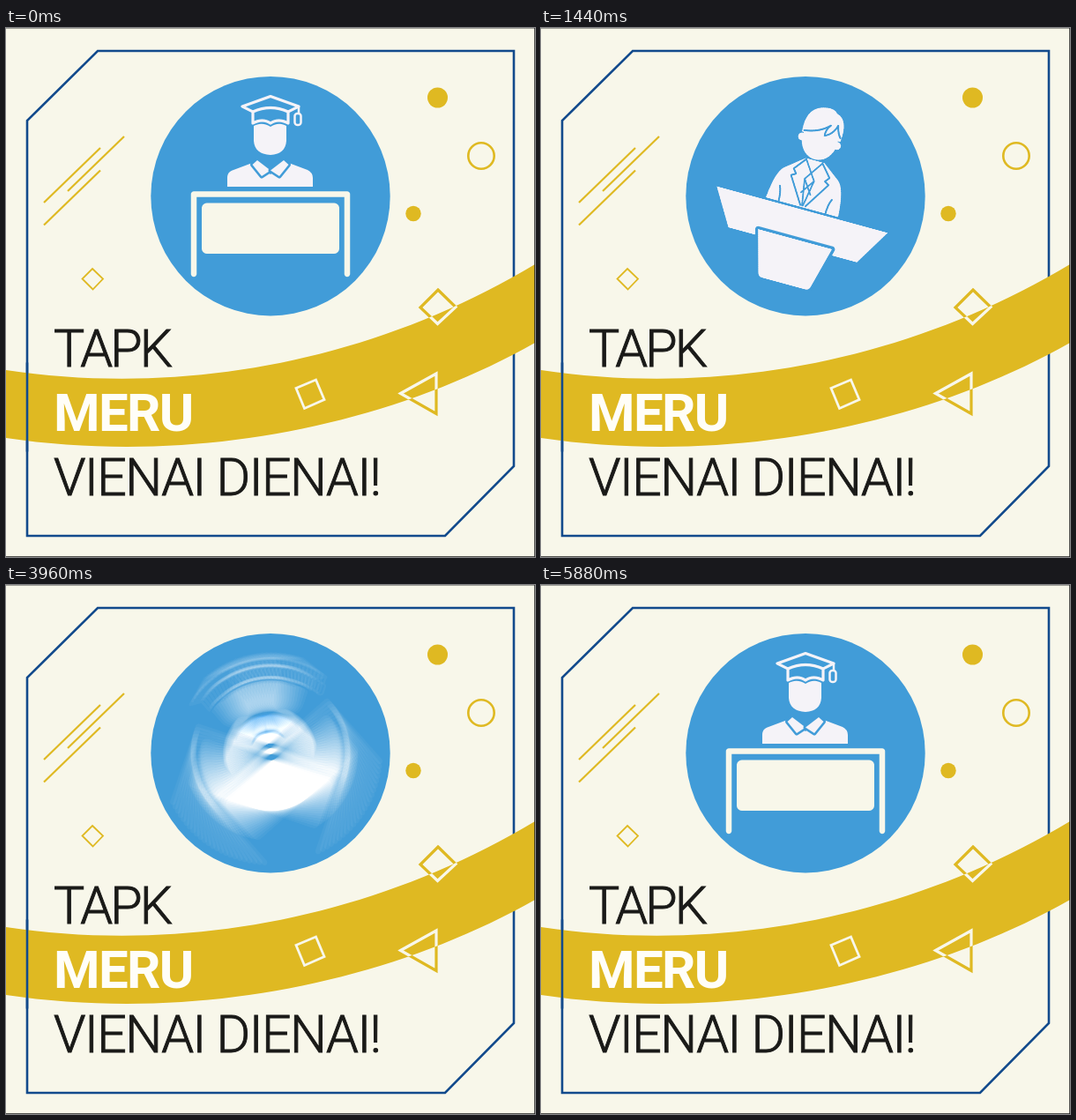
These frames come from a looping animation (600 px wide and 600 px high, 6160 ms). An HTML page with a canvas:

```html
<!DOCTYPE html>
<html lang="lt">
<head>
<meta charset="utf-8">
<style>
html, body { margin: 0; width: 100%; height: 100%; overflow: hidden; background: #f8f7ea; }
canvas { display: block; width: 600px; height: 600px; }
</style>
</head>
<body>
<canvas id="stage" width="600" height="600"></canvas>
<script>
const CREAM = '#f8f7ea', GOLD = '#dfb922', BLUE = '#419cd8', NAVY = '#124a8c',
      INK = '#1a1a18', PALE = '#f5f3f8';
const LOOP = 6160, TURNS = [490, 3610], SWAP = 347, SETTLE = 950, TAIL = 420;
const CX = 300.5, CY = 190.5;

const stage = document.getElementById('stage').getContext('2d');

function layer(scale, draw) {
  const c = document.createElement('canvas');
  c.width = c.height = 600 * scale;
  const g = c.getContext('2d');
  g.scale(scale, scale);
  g.lineCap = g.lineJoin = 'round';
  if (draw) draw(g);
  return c;
}

function fill(g, d, color) {
  g.fillStyle = color;
  g.fill(new Path2D(d));
}

function line(g, d, color, width) {
  g.strokeStyle = color;
  g.lineWidth = width;
  g.stroke(new Path2D(d));
}

function disc(g, x, y, r, color) {
  g.fillStyle = color;
  g.beginPath();
  g.arc(x, y, r, 0, Math.PI * 2);
  g.fill();
}

function drawStudent(g) {
  // shoulders and collar
  fill(g, 'M251 180V170Q251 163 258 161L282 152L300 166L318 152L342 161Q348 164 348 170V180Z', PALE);
  fill(g, 'M284 147H316L300 161Z', BLUE);
  for (const flap of ['M285 150L300 161.5L290 168L279.5 155Z', 'M315 150L300 161.5L310 168L320.5 155Z']) {
    line(g, flap, BLUE, 5);
    fill(g, flap, PALE);
  }
  // face
  fill(g, 'M281 111Q291 106 300 112Q309 106 318 111V128Q317 143 300 144Q282 143 281 128Z', PALE);
  // cap and tassel
  line(g, 'M280 95V108Q291 102 300 108Q309 102 320 108V95', PALE, 3.2);
  line(g, 'M280 95Q300 86 320 95L332 89L300 77.5L268 89Z', PALE, 3.2);
  line(g, 'M332 89V97', PALE, 2.5);
  g.strokeStyle = PALE;
  g.lineWidth = 2.5;
  g.beginPath();
  g.roundRect(327.5, 97, 7, 13, 3);
  g.stroke();
  // desk
  line(g, 'M213 279V188.5H387V279', CREAM, 6.5);
  g.fillStyle = CREAM;
  g.beginPath();
  g.roundRect(222, 198.5, 156, 57.5, 6);
  g.fill();
}

function drawMayor(g) {
  // jacket
  fill(g, 'M257 204Q260 171 269 165L289 149H311L331 164Q340 171 342 204Z', PALE);
  line(g, 'M290 150L279 164L283 169L278 172L297 202M309 150L321 164L317 169L322 172L303 202', BLUE, 2);
  line(g, 'M290 150L305 172L294 188M309 150L294 172L305 188M294 172L299 202M305 172L300 202', BLUE, 1.8);
  line(g, 'M269 187Q272 194 272 204M330 187Q327 194 327 204', BLUE, 2);
  // head
  disc(g, 278.5, 126.5, 4.5, PALE);
  disc(g, 319.5, 126.5, 4.5, PALE);
  fill(g, 'M279 116V130Q284 147 299 148Q314 147 319 130V116Z', PALE);
  fill(g, 'M277 121Q274 92 296 88Q306 86 310 91Q325 95 322 121Q300 124 277 121Z', PALE);
  line(g, 'M279 119Q296 117 307 106Q302 112 303 119Q312 115 315 104Q317 113 321 117', BLUE, 2);
  // lectern
  const top = 'M200 206.5H401L376 248H225Z', foot = 'M258 241H345L333 288Q332 293 327 293H277Q272 293 271 288Z';
  line(g, top, BLUE, 3);
  fill(g, top, PALE);
  line(g, foot, BLUE, 6.5);
  fill(g, foot, PALE);
}

function drawShapes(g, color) {
  g.lineJoin = 'miter';
  line(g, 'M490 297L510 316.5L489.5 335.5L470 317Z', color, 3.2);
  line(g, 'M447.5 414.5L488 392V437.5Z', color, 3.2);
  line(g, 'M329 408.5L351.5 399L361 421.5L338.5 431.5Z', color, 2.8);
}

function drawBackdrop(g) {
  g.fillStyle = CREAM;
  g.fillRect(0, 0, 600, 600);
  g.lineJoin = 'miter';
  line(g, 'M104 26H576V497L498 576H24V105Z', NAVY, 2.6);

  drawShapes(g, GOLD);
  const band = new Path2D('M0 388C200 418 415 379 600 268V357C430 453 210 496 0 465Z');
  g.save();
  g.clip(band);
  g.fillStyle = GOLD;
  g.fillRect(0, 0, 600, 600);
  drawShapes(g, CREAM);
  g.restore();
  line(g, 'M24 380V480', NAVY, 2.6);

  g.lineCap = 'butt';
  for (const [x, y] of [[43, 198], [70, 185], [43, 223.5]]) line(g, `M${x} ${y}l64 -62`, GOLD, 2.2);
  line(g, 'M98 273L110 284.5L98.5 296.5L86.5 284.5Z', GOLD, 1.8);
  disc(g, 489.5, 79, 11.5, GOLD);
  disc(g, 462, 210.5, 8.7, GOLD);
  g.lineWidth = 2.6;
  g.strokeStyle = GOLD;
  g.beginPath();
  g.arc(539, 145, 14.7, 0, Math.PI * 2);
  g.stroke();

  disc(g, 300, 190.7, 135.7, BLUE);

  const words = [
    ['TAPK', 384, 300, INK, 59, -2.8],
    ['MERU', 457, 700, '#fffef8', 60, -1.6],
    ['VIENAI DIENAI!', 530, 300, INK, 59, -1.5],
  ];
  for (const [text, y, weight, color, size, spacing] of words) {
    g.font = `${weight} ${size}px Roboto, "Open Sans", sans-serif`;
    g.letterSpacing = spacing + 'px';
    g.fillStyle = g.strokeStyle = color;
    g.fillText(text, 54, y);
    // a little extra weight for the light face
    g.lineWidth = 0.9;
    if (weight < 400) g.strokeText(text, 54, y);
  }

  // thin dark rim
  g.fillStyle = 'rgba(30,30,30,.4)';
  g.fillRect(0, 0, 600, 1);
  g.fillStyle = 'rgba(30,30,30,.75)';
  g.fillRect(599, 0, 1, 600);
  g.fillRect(0, 599, 600, 1);
}

const backdrop = layer(1, drawBackdrop);
const student = layer(2, drawStudent), mayor = layer(2, drawMayor);
const smear = layer(1), smearCtx = smear.getContext('2d');

// Degrees turned p ms into a turn: wind up, spin, settle.
function angle(p) {
  if (p <= 0) return 0;
  if (p < SWAP) return -360 * (p / SWAP) ** 2.6;
  if (p < SETTLE) return 360 * Math.exp(-3.158 * ((p - SWAP) / (SETTLE - SWAP)) ** 0.916);
  return 15.3 * Math.max(0, 1 - (p - SETTLE) / TAIL) ** 2;
}

function stamp(g, icon, deg) {
  g.save();
  g.translate(CX, CY);
  g.rotate(deg * Math.PI / 180);
  g.drawImage(icon, -CX, -CY, 600, 600);
  g.restore();
}

function drawIcon(icon, deg, spread) {
  if (spread < 1) {
    stamp(stage, icon, deg);
    return;
  }
  const n = 24;
  smearCtx.clearRect(0, 0, 600, 600);
  smearCtx.globalCompositeOperation = 'lighter';
  smearCtx.globalAlpha = 1 / n;
  for (let i = 0; i < n; i++) stamp(smearCtx, icon, deg + spread * (i / (n - 1) - 0.5));
  smearCtx.globalAlpha = 1;
  smearCtx.globalCompositeOperation = 'source-over';
  stage.drawImage(smear, 0, 0);
}

function render(t) {
  const second = t >= TURNS[1];
  const p = t - TURNS[second ? 1 : 0];
  const swapped = p >= SWAP;
  const deg = angle(p);
  let spread = 0;
  if (swapped) {
    const speed = (deg - angle(p + 10)) / 10;
    spread = Math.min(60, Math.max(0, (speed - 0.12) * 70));
  }
  stage.drawImage(backdrop, 0, 0);
  drawIcon(second === swapped ? student : mayor, deg, spread);
}

const start = performance.now();
function tick() {
  render((performance.now() - start) % LOOP);
  requestAnimationFrame(tick);
}
tick();
</script>
</body>
</html>
```
